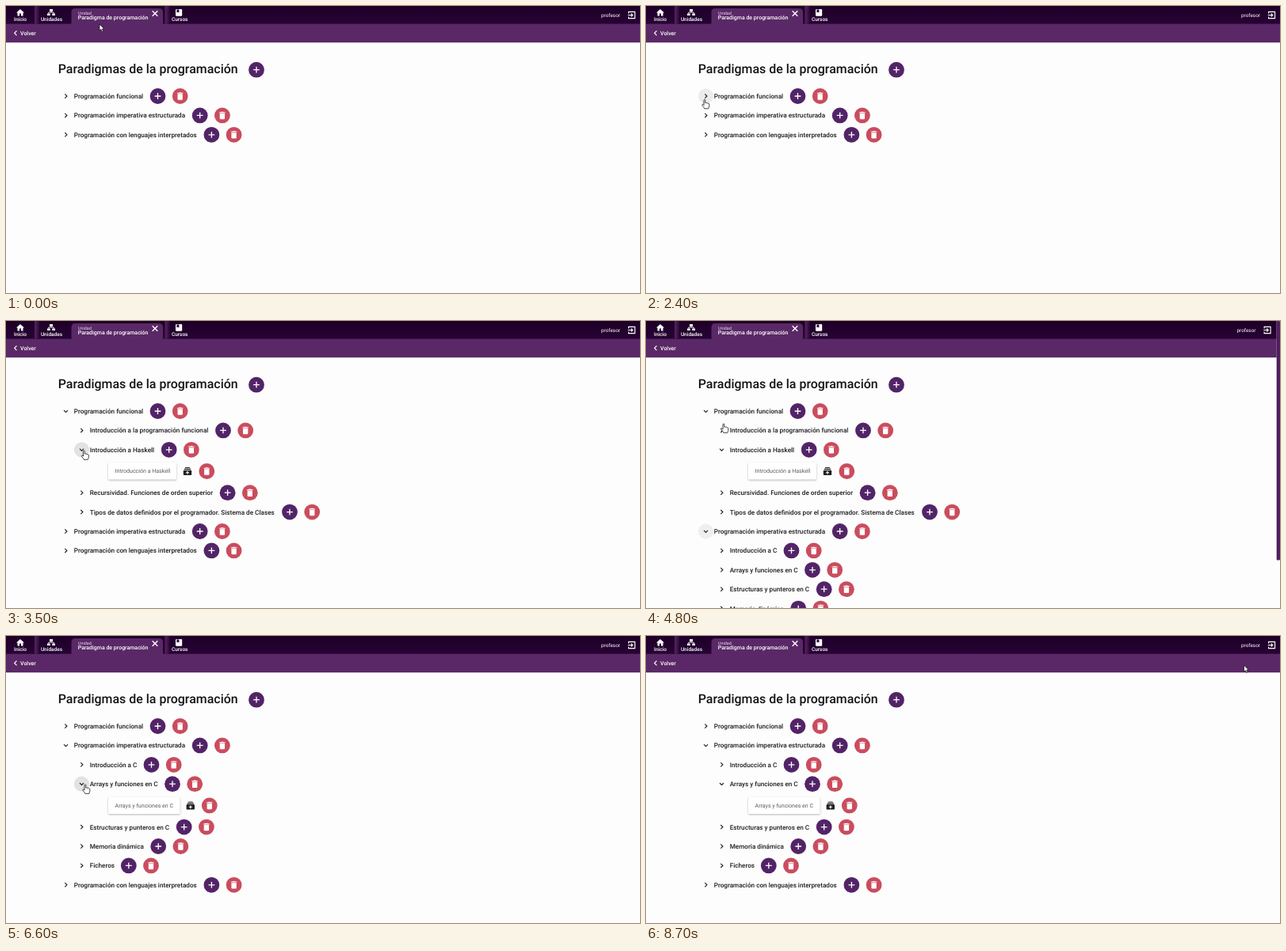
An HTML page that plays this animation: 800 by 363 pixels, repeating every 9 s.

```html
<!DOCTYPE html>
<html lang="es">
<head>
<meta charset="utf-8">
<title>Paradigmas de la programación</title>
<style>
  html, body { margin: 0; width: 100%; height: 100%; overflow: hidden; background: #fefdfe; }
  svg { display: block; width: 100%; height: 100%; }
  text { font-family: Roboto, Arial, sans-serif; text-rendering: geometricPrecision; }
  .med { font-weight: 500; }
  .tab { font-size: 6.5px; font-weight: 500; fill: #fff; text-anchor: middle; }
  .row { font-size: 8.17px; font-weight: 500; fill: #1d1b1e; }
  .leaf { font-size: 7.05px; fill: #5c595d; }
  .card { fill: #fff; filter: drop-shadow(0 1px 1px rgba(0, 0, 0, .28)); }
  .line { fill: none; stroke: #262327; stroke-width: 1.2; }
</style>
</head>
<body>
<svg viewBox="0 0 800 363" preserveAspectRatio="none">
  <defs>
    <linearGradient id="sep">
      <stop offset="0" stop-color="#54235f"/>
      <stop offset=".4" stop-color="#46194f"/>
      <stop offset="1" stop-color="#22002e"/>
    </linearGradient>
    <linearGradient id="bar" x2="0" y2="1">
      <stop offset="0" stop-color="#1d0027"/>
      <stop offset="1" stop-color="#280335"/>
    </linearGradient>
    <path id="bin" d="M-6 7c0 1.1.9 2 2 2h8c1.1 0 2-.9 2-2V-5H-6zM7-8H3.5l-1-1h-5l-1 1H-7v2H7z"/>
    <g id="add">
      <circle r="9.9" fill="#522467"/>
      <path d="M-3.9 0h7.8M0-3.9v7.8" stroke="#fff" stroke-width="1.3"/>
    </g>
    <g id="del">
      <circle r="9.9" fill="#c94d5e"/>
      <use href="#bin" transform="scale(.53)" fill="#fff"/>
    </g>
    <g id="stack" fill="#222">
      <path d="M-3-5h6v1.1h-6zM-4.2-3.2h8.4v1.2h-8.4z"/>
      <rect x="-5.2" y="-1.3" width="10.4" height="6.3" rx="1"/>
      <path d="M-2 1.8h4M0-.2v4" stroke="#fff" stroke-width="1.1"/>
    </g>
    <path id="arrow" d="M0 0v8.2l1.9-1.7 1.3 2.9 1.5-.7-1.3-2.8h2.6z" fill="#fff" stroke="#181018" stroke-width=".8" stroke-linejoin="round"/>
    <path id="hand" d="M-1 .7C-1-.4.8-.4.8.7V4.2C1.2 3.5 2.4 3.6 2.6 4.4 3.1 3.9 4.2 4.1 4.3 4.9 4.9 4.5 5.8 4.8 5.8 5.7V8.2C5.8 9.4 5 10 4.8 11.3H-.3C-.6 9.8-2.1 8.7-3.1 7-3.6 5.9-2.4 5.5-1.8 6.2L-1 7z" fill="#fff" stroke="#222" stroke-width=".85" stroke-linejoin="round"/>
  </defs>

  <rect width="800" height="363" fill="#fefdfe"/>
  <rect width="800" height="23" fill="url(#bar)"/>
  <rect y="22.6" width="800" height="23.6" fill="#5a2867"/>
  <rect x="36" width="7" height="22.6" fill="url(#sep)"/>
  <rect x="200.5" width="7" height="22.6" fill="url(#sep)"/>
  <path d="M82.5 23V8q0-5 5-5H193q5 0 5 5V23z" fill="#5a2867"/>

  <path transform="translate(12 2.4) scale(.5)" d="M10 20v-6h4v6h5v-8h3L12 3 2 12h3v8z" fill="#fff"/>
  <path d="M55 4h4v2.8h-4zM52 9.4h3.7v2.7H52zM58.3 9.4H62v2.7h-3.7z" fill="#fff"/>
  <path d="M57 6.5V8M53.8 9.6V8h6.4v1.6" fill="none" stroke="#fff" stroke-width=".9"/>
  <rect x="214" y="4" width="8.2" height="8.8" rx="1" fill="#fff"/>
  <path d="M215.4 4.6h3v4l-1.5-1-1.5 1z" fill="#250030"/>
  <path d="M184.7 6.2l6.6 6.6m0-6.6l-6.6 6.6" stroke="#fff" stroke-width="1.4"/>
  <text class="tab" x="18" y="19.4">Inicio</text>
  <text class="tab" x="57.5" y="19.4">Unidades</text>
  <text class="tab" x="219.2" y="19.4">Cursos</text>
  <text x="91" y="10.8" font-size="5.4" fill="#eadfee">Unidad</text>
  <text class="med" x="90.7" y="17.4" font-size="7" fill="#fff">Paradigma de programación</text>
  <path d="M13.5 31.4l-2.8 2.9 2.8 2.9" fill="none" stroke="#fff" stroke-width="1.2"/>
  <text class="med" x="18" y="36.8" font-size="7" fill="#fff">Volver</text>
  <g id="user">
    <text x="751" y="13.7" font-size="6.4" fill="#fff">profesor</text>
    <path d="M785.6 9.6V7.4h8v8.2h-8v-2.2M784.8 11.5h5.6M788.6 9.3l2.2 2.2-2.2 2.2" fill="none" stroke="#fff" stroke-width="1.1"/>
  </g>

  <text class="med" x="65.7" y="85" font-size="15.95" fill="#151316">Paradigmas de la programación</text>
  <use href="#add" x="316" y="80.7"/>
  <g id="tree"></g>
  <g id="scroll">
    <rect x="795.7" width="4.3" height="363" fill="#fefdfe"/>
    <rect x="795.7" width="4.3" height="302.5" rx="1" fill="#4d205d"/>
  </g>
  <use id="cursor" href="#arrow"/>
</svg>
<script>
const LOOP = 9000, STEP = 100, ROW = 24.4, LEAF = 54.4;
const $ = id => document.getElementById(id);

// add: centre of the plus button; open: [from, to]; leaf: [card width, icon x, bin x]
const nodes = [
  { text: 'Programación funcional', add: 191.5, open: [2600, 5300], kids: [
    { text: 'Introducción a la programación funcional', add: 274 },
    { text: 'Introducción a Haskell', add: 205.7, open: [3400, LOOP], leaf: [86, 229, 253.3] },
    { text: 'Recursividad. Funciones de orden superior', add: 279.6 },
    { text: 'Tipos de datos definidos por el programador. Sistema de Clases', add: 358 }
  ] },
  { text: 'Programación imperativa estructurada', add: 244.7, open: [4400, LOOP], kids: [
    { text: 'Introducción a C', add: 183.5 },
    { text: 'Arrays y funciones en C', add: 210, open: [6500, LOOP], leaf: [90.5, 232.8, 256.8] },
    { text: 'Estructuras y punteros en C', add: 224.7 },
    { text: 'Memoria dinámica', add: 192.2 },
    { text: 'Ficheros', add: 154.8 }
  ] },
  { text: 'Programación con lenguajes interpretados', add: 259.4 }
];

// halo behind a chevron: from, to, x, y, shade
const halos = [
  [1900, 2500, 75.5, 114, '#ecebed'],
  [2500, 2800, 75.5, 114, '#e2e1e3'],
  [3200, 3800, 95.5, 162.8, '#e2e1e3'],
  [4100, 4600, 75.5, 266, '#e2e1e3'],
  [4600, 5200, 75.5, 266, '#efeef0'],
  [5200, 5700, 75.5, 114, '#e2e1e3'],
  [6300, 7500, 95.5, 187.2, '#e2e1e3']
];

// pointer tip: time, x, y
const path = [
  [0, 118, 23], [1000, 118, 25], [1900, 74, 118.5], [2600, 74, 118.5],
  [3300, 98.5, 164], [3600, 98.5, 164], [4100, 74.5, 268], [4500, 74.5, 268],
  [4800, 98, 130], [5200, 83, 113], [5500, 83, 113], [6200, 97, 166],
  [6400, 100, 188], [7400, 100, 188], [8400, 768, 40], [8700, 754.5, 37], [LOOP, 754.5, 37]
];
const handTimes = [[1900, 2800], [3100, 3800], [4000, 5700], [6200, 7500]];

const within = (t, span) => !!span && t >= span[0] && t < span[1];

function pointerAt(t) {
  const i = path.findIndex((p, k) => k && t < p[0]);
  const [a, b] = [path[i - 1], path[i]];
  const u = (t - a[0]) / (b[0] - a[0]), e = u * u * (3 - 2 * u);
  return [a[1] + (b[1] - a[1]) * e, a[2] + (b[2] - a[2]) * e];
}

const use = (id, x, y) => `<use href="#${id}" x="${x}" y="${y}"/>`;

function rowMarkup(node, x, y, open) {
  const chevron = open ? 'm-2.5-1.2 2.5 2.5 2.5-2.5' : 'm-1.2-2.6 2.6 2.6-2.6 2.6';
  return `<path class="line" d="M${x} ${y}${chevron}"/>` +
    `<text class="row" x="${x + 10.2}" y="${y + 2.9}">${node.text}</text>` +
    use('add', node.add, y) + use('del', node.add + 28.2, y);
}

function leafMarkup(node, y) {
  const [width, icon, bin] = node.leaf;
  return `<rect class="card" x="129" y="${y - 11}" width="${width}" height="21.6" rx="1.5"/>` +
    `<text class="leaf" x="137.6" y="${y + 2.2}">${node.text}</text>` +
    use('stack', icon, y) + use('del', bin, y);
}

function layout(t) {
  let y = 114, out = '';
  const walk = (list, x) => list.forEach(node => {
    const open = within(t, node.open);
    out += rowMarkup(node, x, y, open);
    if (open && node.leaf) {
      out += leafMarkup(node, y + 27.2);
      y += LEAF;
    } else {
      y += ROW;
    }
    if (open && node.kids) walk(node.kids, x + 20);
  });
  walk(nodes, 75.5);
  return { out, bottom: y };
}

let shown = '';
function draw(t) {
  const { out, bottom } = layout(t);
  const glow = halos.filter(h => within(t, h))
    .map(([, , x, y, shade]) => `<circle cx="${x}" cy="${y}" r="9.6" fill="${shade}"/>`).join('');
  if (glow + out !== shown) $('tree').innerHTML = shown = glow + out;

  const overflow = bottom > 363;
  $('scroll').setAttribute('visibility', overflow ? 'visible' : 'hidden');
  $('user').setAttribute('transform', `translate(${overflow ? -5.5 : 0} 0)`);

  const [x, y] = pointerAt(t);
  $('cursor').setAttribute('href', handTimes.some(s => within(t, s)) ? '#hand' : '#arrow');
  $('cursor').setAttribute('transform', `translate(${x} ${y})`);
}

const start = performance.now();
function tick() {
  const t = (performance.now() - start) % LOOP;
  draw(Math.floor(t / STEP) * STEP);
  requestAnimationFrame(tick);
}
tick();
</script>
</body>
</html>
```
